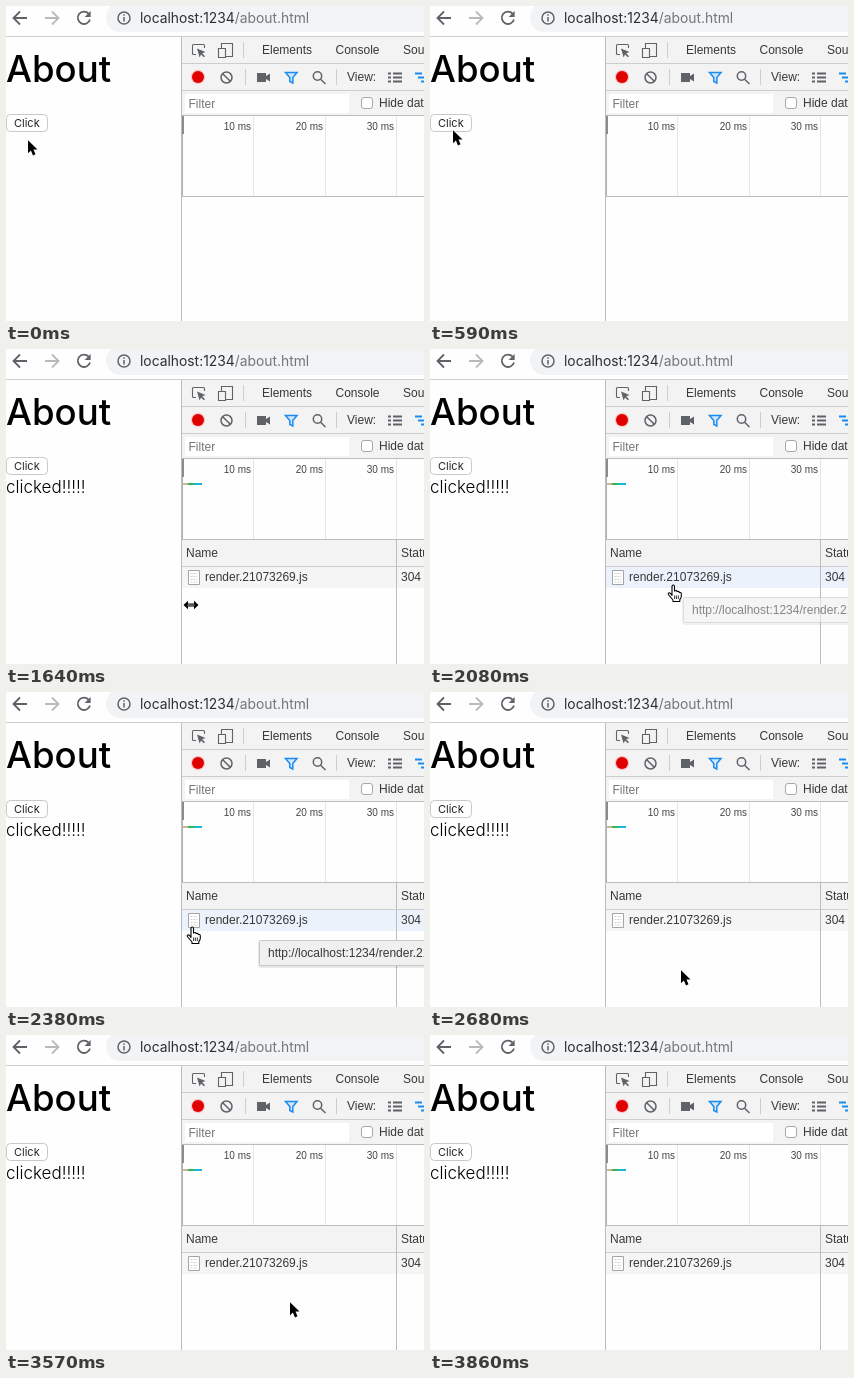
Recreate the animation shown at these times as an HTML page. Size 418 px wide and 315 px high, loop 4310 ms.

```html
<!DOCTYPE html>
<html lang="en">
<head>
<meta charset="utf-8">
<title>Network panel demo</title>
<style>
  html, body { margin: 0; width: 100%; height: 100%; overflow: hidden; background: #fff; }
  svg { display: block; width: 418px; height: 315px; }
  text { font: 12px "Liberation Sans", Arial, sans-serif; fill: #383838; white-space: pre; }
  .page { font-family: Inter, sans-serif; fill: #000; }
  .ruler text { font-size: 10px; fill: #444; text-anchor: end; }
  .line { fill: none; stroke: #5f6368; stroke-width: 1.5; }
  .nav { stroke-width: 1.8; }
  .thin { stroke-width: 1.1; }
  .rule { fill: none; stroke: #cdcdcd; shape-rendering: crispEdges; }
</style>
</head>
<body>
<svg viewBox="0 0 418 315">
  <rect width="418" height="315" fill="#fefefe"/>

  <!-- address bar -->
  <rect x="100" y="-3" width="340" height="29" rx="14.5" fill="#f1f3f4"/>
  <path class="rule" d="M0 30.5H418"/>
  <g class="line nav">
    <path d="M21 12H8M14 5.5L7.5 12L14 18.5"/>
    <path d="M39 12H52M46 5.5L52.5 12L46 18.5" style="stroke:#b8babd"/>
    <path d="M82.6 7.6A6.2 6.2 0 1 0 84 13.5"/>
    <path d="M84.6 5V11H78.6Z" fill="#5f6368" stroke="none"/>
  </g>
  <g class="line">
    <circle cx="118" cy="12" r="6"/>
    <path d="M118 11V15.5M118 8.2V9.7"/>
  </g>
  <text class="page" x="134" y="17" style="font-size:13.85px;fill:#2d2f33">localhost:1234<tspan fill="#73777c">/about.html</tspan></text>

  <!-- page -->
  <text class="page" x="0" y="76" style="font-size:36.6px;font-weight:500">About</text>
  <rect x=".5" y="108.5" width="41" height="17" rx="4" fill="#fff" stroke="#c8c8c8"/>
  <text class="page" x="8" y="121" style="font-size:11px;fill:#222">Click</text>
  <text class="page after" x="0" y="144" style="font-size:17px;font-weight:300">clicked!!!!!</text>

  <!-- panel toolbars -->
  <rect x="176" y="31" width="242" height="79" fill="#f3f3f3"/>
  <path class="rule" d="M176 57.5H418M176 84.5H418M237.5 36V52M239.5 63V79M330.5 63V79"/>
  <path class="rule" d="M176 109.5H418M175.5 31V315" style="stroke:#bcbcbc"/>
  <g class="line thin">
    <path d="M190 48.5H187.5Q186.5 48.5 186.5 47.5V39.5Q186.5 38.5 187.5 38.5H197.5Q198.5 38.5 198.5 39.5V42"/>
    <path d="M191 42.5L199.5 46L196.2 47.3L199 50.2L197.8 51.3L195 48.5L193.6 51.5Z" fill="#5f6368" stroke="none"/>
    <path d="M215.5 42V37.5H226.5V50.5H220M212.5 42.5H219.5V51.5H212.5Z"/>
  </g>
  <text x="256" y="48">Elements</text>
  <text x="329.5" y="48">Console</text>
  <text x="397" y="48">Sources</text>

  <circle cx="192" cy="71" r="7.2" fill="#f6c4c4"/>
  <circle cx="192" cy="71" r="6" fill="#e00000"/>
  <g class="line">
    <circle cx="220.5" cy="71.5" r="5.5"/>
    <path d="M216.7 67.7L224.3 75.3"/>
    <path d="M251 67H260V70L264 67.5V75.5L260 73V76H251Z" fill="#5f6368" stroke="none"/>
    <path d="M279.5 66.5H291L286.8 71.5V77L283.8 75.5V71.5Z" style="stroke:#1a8cf0" fill="#cfe6fc"/>
    <circle cx="311.5" cy="70" r="4.2"/>
    <path d="M314.6 73.2L319.5 78"/>
    <path d="M382 67.5H385M387 67.5H396M382 71.5H385M387 71.5H396M382 75.5H385M387 75.5H396" style="stroke-width:2"/>
    <path d="M409 67.5H416M412 71.5H418M415 75.5H418" style="stroke:#1a8cf0;stroke-width:2"/>
  </g>
  <text x="341" y="75">View:</text>
  <rect x="179" y="88" width="164" height="19" fill="#fff"/>
  <text x="182.5" y="102" style="fill:#757575">Filter</text>
  <rect x="355.5" y="91.5" width="11" height="11" rx="2.5" fill="#fff" stroke="#a8a8a8"/>
  <text x="373" y="101">Hide data URLs</text>

  <!-- overview -->
  <path class="rule" d="M247.5 110V190M319.5 110V190M390.5 110V190" style="stroke:#e6e6e6"/>
  <path class="rule" d="M176 190.5H418" style="stroke:#bcbcbc"/>
  <path class="rule" d="M176.5 110V190" style="stroke:#b0b0b0"/>
  <rect x="176" y="110" width="2" height="18" fill="#8b8b8b"/>
  <g class="ruler">
    <text x="245" y="124">10 ms</text><text x="317" y="124">20 ms</text><text x="388" y="124">30 ms</text>
  </g>
  <g class="after">
    <rect x="177" y="134" width="5" height="2" fill="#c9b69c"/>
    <rect x="182" y="134" width="6" height="2" fill="#35b558"/>
    <rect x="188" y="134" width="8" height="2" fill="#18b9d6"/>
  </g>

  <!-- request table -->
  <g class="after">
    <rect x="176" y="191" width="242" height="26" fill="#f3f3f3"/>
    <rect id="row" x="176" y="218" width="242" height="21"/>
    <path class="rule" d="M176 217.5H418"/>
    <path class="rule" d="M390.5 191V315" style="stroke:#bcbcbc"/>
    <text x="180" y="208">Name</text><text x="395" y="208">Status</text>
    <path d="M182.5 221.5H193.5V235.5H182.5Z" fill="#fff" stroke="#a4a4a4"/>
    <path d="M184.5 224.5H191.5M184.5 227.5H191.5M184.5 230.5H191.5M184.5 233H191.5" stroke="#d2d2d2" stroke-dasharray="2 1"/>
    <text x="199" y="232">render.21073269.js</text><text x="395" y="232">304</text>
  </g>

  <g id="tip">
    <rect x="-1" y="1" width="242" height="27" rx="2" fill="#000" opacity=".09"/>
    <rect x=".5" y=".5" width="240" height="25" rx="1" fill="#f0f0f0" stroke="#c6c6c6"/>
    <text x="9" y="17">http://localhost:1234/render.21073269.js</text>
  </g>

  <g id="arrow" class="cursor">
    <path d="M2 1.2V14.2L4.9 11.5L7 16.4L9.5 15.3L7.5 10.6H11.5Z" fill="#000" stroke="#fff" stroke-width="1.6" paint-order="stroke"/>
  </g>
  <g id="resize" class="cursor">
    <path d="M1 6L5.5 1.8V4.5H11.5V1.8L16 6L11.5 10.2V7.5H5.5V10.2Z" fill="#000" stroke="#fff" stroke-width="1.6" paint-order="stroke"/>
    <path d="M5 6H12" stroke="#fff" stroke-width=".7"/>
  </g>
  <g id="hand" class="cursor">
    <path d="M5 11.5V2.4Q5 1 6.2 1Q7.5 1 7.5 2.4V7Q9.8 5.8 10 7.6Q12.2 6.8 12.3 8.4Q14.4 8 14.3 10V12.5Q14 14.5 12.8 15.5V17.5H6V16L1.3 10.5Q.8 8.8 2.5 8.8Q3.5 9 5 11.5Z" fill="#fff" stroke="#000" stroke-width="1.1" stroke-linejoin="round"/>
    <path d="M7.6 11.5V15M9.4 11.5V15M11.3 11.5V15" stroke="#000" stroke-width=".8"/>
  </g>
</svg>
<script>
const LOOP = 4310, CLICK = 1040;

// time, cursor, x, y, then optionally tooltip opacity, x, y
const steps = [
  [0, "arrow", 20, 133],
  [590, "arrow", 21, 123],
  [740, "arrow", 20, 113],
  [1340, "arrow", 43, 127],
  [1490, "arrow", 154, 253],
  [1640, "resize", 176.5, 250],
  [1790, "arrow", 235, 244],
  [1930, "arrow", 240, 242],
  [2080, "hand", 237, 235, .6, 253, 248],
  [2230, "hand", 246, 227, 1, 253, 248],
  [2380, "hand", 180, 234, 1, 253, 248],
  [2530, "arrow", 184, 202, .4, 253, 248],
  [2680, "arrow", 249, 277],
  [2820, "arrow", 184, 194],
  [2970, "hand", 226, 234, 1, 243, 239],
  [3120, "arrow", 225, 251],
  [3420, "arrow", 237, 252],
  [3570, "arrow", 282, 266],
  [3710, "arrow", 339, 296],
  [3860, "none", 0, 0]
];

const byId = id => document.getElementById(id);
const show = (el, on) => { el.style.visibility = on ? "visible" : "hidden"; };
const place = (el, x, y) => el.setAttribute("transform", `translate(${x} ${y})`);
const cursors = document.querySelectorAll(".cursor");
const results = document.querySelectorAll(".after");
const tip = byId("tip"), row = byId("row");

function draw(time) {
  const [, cursor, x, y, opacity = 0, tipX = 0, tipY = 0] = steps.findLast(s => s[0] <= time);
  for (const el of cursors) {
    show(el, el.id === cursor);
    place(el, x, y);
  }
  for (const el of results) show(el, time >= CLICK);
  tip.style.opacity = opacity;
  place(tip, tipX, tipY);
  row.setAttribute("fill", cursor === "hand" ? "#ebf2fc" : "#f5f5f5");
}

function tick() {
  draw(performance.now() % LOOP);
  requestAnimationFrame(tick);
}
tick();
</script>
</body>
</html>
```
